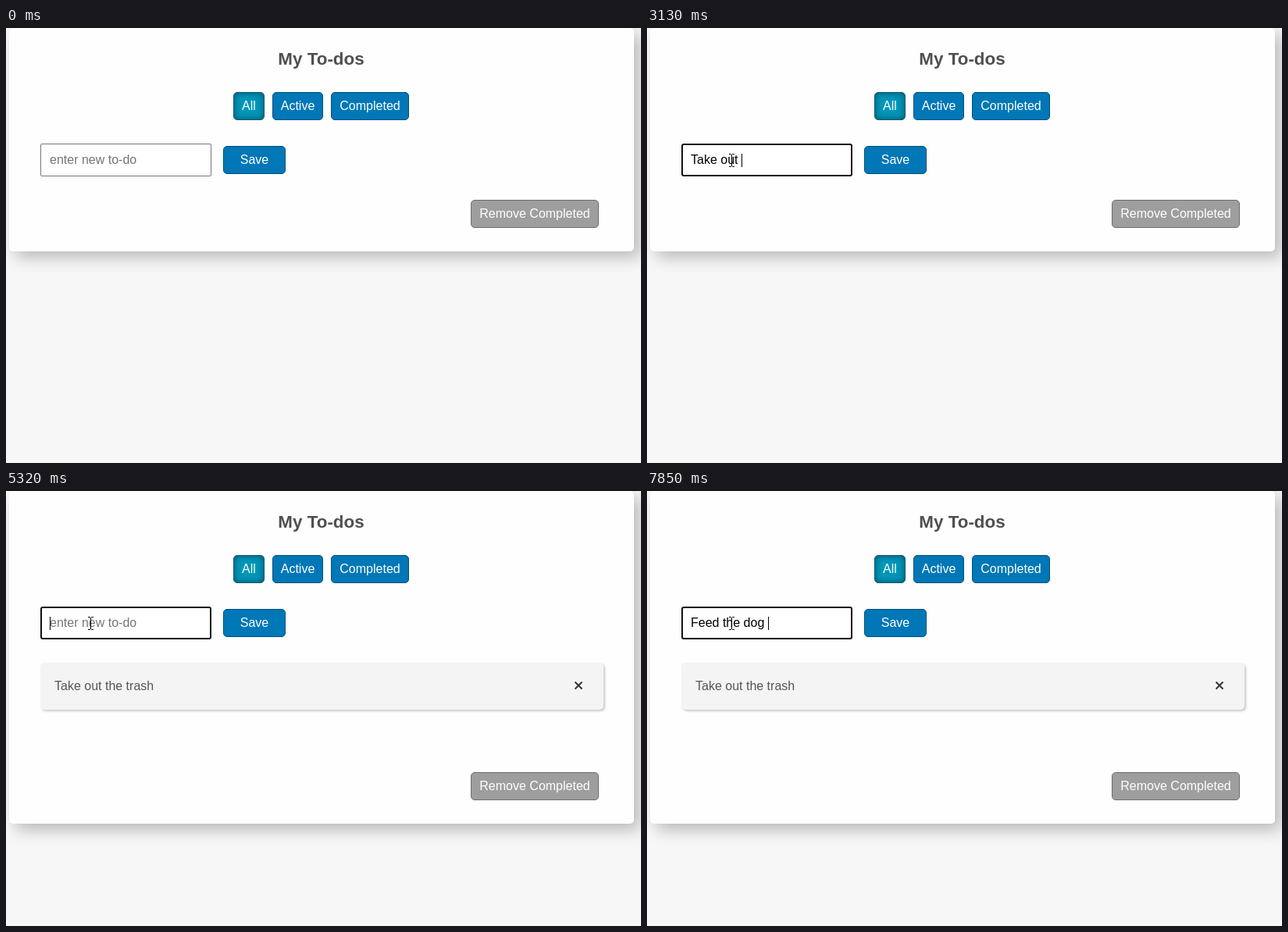
Write an HTML page that moves like this. It is 813 px wide and 557 px high and loops after 8 s.

```html
<!DOCTYPE html>
<html lang="en">
<head>
<meta charset="utf-8">
<title>To-dos</title>
<style>
  html, body { margin: 0; width: 100%; height: 100%; overflow: hidden; background: #f7f7f7; }
  #stage { position: relative; width: 813px; height: 557px; overflow: hidden; background: #f7f7f7;
    font: 16px/18px "Liberation Sans", Arial, sans-serif; }
  #stage > *, #card > * { position: absolute; box-sizing: border-box; }
  #card { left: 4px; top: 0; width: 800px; height: 286px; border-radius: 5px; background: #fefefe;
    box-shadow: 8px 8px 20px rgba(0, 0, 0, .25); }
  h1 { left: 0; top: 27px; width: 799px; margin: 0; font-size: 22.4px; line-height: 26px;
    text-align: center; color: #4f4f4f; }
  .button { height: 36px; padding-top: 8px; border: 1px solid #00507c; border-radius: 5px;
    background: #0077b6; color: #fff; text-align: center; white-space: nowrap; }
  .pressed { background: #0096b8; border-color: #035a72; box-shadow: inset 0 0 9px rgba(0, 40, 60, .65); }
  #remove { background: #9e9e9e; border-color: #6e6e6e; }
  #field { left: 40px; top: 148px; width: 219px; height: 42px; border: 1px solid #767676;
    border-radius: 2px; background: #fff; }
  #field.focus { border: 2px solid #101010; border-radius: 3px; }
  #line { left: 52px; top: 160px; height: 18px; white-space: pre; color: #000; }
  #caret { display: inline-block; vertical-align: top; width: 1px; height: 17px;
    margin: 1px -1px 0 0; background: #000; }
  #hint { color: #757575; }
  #item { left: 40px; top: 220px; width: 721px; height: 60px; padding: 21px 18px; border-radius: 5px;
    background: #f4f4f4; color: #555; box-shadow: 2px 2px 3px rgba(0, 0, 0, .2); }
  #pointers { left: 0; top: 0; }
</style>
</head>
<body>
<div id="stage">
  <div id="card">
    <h1>My To-dos</h1>
    <div class="button pressed" style="left:287px;top:82px;width:40px">All</div>
    <div class="button" style="left:337px;top:82px;width:65px">Active</div>
    <div class="button" style="left:412px;top:82px;width:100px">Completed</div>
    <div id="field"></div>
    <div id="line"><span id="typed"></span><span id="caret"></span><span id="hint">enter new to-do</span></div>
    <div class="button" style="left:274px;top:151px;width:80px">Save</div>
    <div id="item">Take out the trash
      <svg width="12" height="12" style="position:absolute;left:683px;top:23px">
        <path d="M1.5 1.5l9 9m0-9l-9 9" stroke="#333" stroke-width="2"/>
      </svg>
    </div>
    <div id="remove" class="button" style="left:591px;width:164px">Remove Completed</div>
  </div>
  <svg id="pointers" width="813" height="557">
    <circle id="click" cx="107" cy="168" r="12" fill="#ffff00" fill-opacity=".55"/>
    <path id="arrow" d="M.5.5v16l3.7-3.6 2.5 5.7 2.3-1-2.5-5.6h5.2z" fill="#fff" stroke="#000"/>
    <path id="beam" d="M-3 -7.5h2.5l1 1 1 -1h2.5M.5 -7v15M-3 8.5h2.5l1 -1 1 1h2.5" fill="none" stroke="#000"/>
  </svg>
</div>
<script>
const LOOP = 8000, FOCUS = 790, RELEASE = 860, SAVED = 5320;

// [time, x, y]
const path = [[210, 515, 323], [280, 330, 222], [340, 160, 150], [410, 44, 127], [540, 90, 160], [610, 108, 169]];

// [time, text in the field]
const type = (text, times) => times.map((time, i) => [time, text.slice(0, i + 1)]);
const typing = [
  [0, ""],
  ...type("Take out the trash ", [1940, 2270, 2540, 2610, 2740, 2800, 2940, 3000, 3130,
    3460, 3600, 3670, 3800, 3990, 4120, 4260, 4650, 4990, 5050]),
  [SAVED, ""],
  ...type("Feed t", [6460, 6660, 6720, 6920, 6990, 7110]),
  [7180, "Feed the"],
  ...type("Feed the dog ", [7250, 7390, 7450, 7720, 7850].map(t => t)).map(([time], i) =>
    [time, "Feed the dog ".slice(0, 9 + i)])
];

// [time, visible]
const blinks = [[0, false], [FOCUS, true], [1340, false], [1870, true], [5580, false], [6120, true]];

const $ = id => document.getElementById(id);
const latest = (steps, t) => steps.findLast(step => step[0] <= t);
const show = (id, on) => { $(id).style.visibility = on ? "visible" : "hidden"; };

function render(t) {
  const text = latest(typing, t)[1];
  const saved = t >= SAVED;
  $("typed").textContent = text;
  $("hint").style.display = text ? "none" : "";
  show("caret", latest(blinks, t)[1]);
  $("field").classList.toggle("focus", t >= FOCUS);

  $("card").style.height = saved ? "426px" : "286px";
  $("remove").style.top = saved ? "360px" : "220px";
  show("item", saved);

  const [, x, y] = latest(path, t) || [];
  const inField = x >= 44 && x < 263 && y >= 148 && y < 190;
  show("beam", inField);
  show("arrow", x !== undefined && !inField);
  show("click", t >= FOCUS && t < RELEASE);
  if (x !== undefined)
    for (const id of ["beam", "arrow"]) $(id).setAttribute("transform", `translate(${x} ${y})`);
}

const start = performance.now();
function tick() {
  render((performance.now() - start) % LOOP);
  requestAnimationFrame(tick);
}
render(0);
requestAnimationFrame(tick);
</script>
</body>
</html>
```
